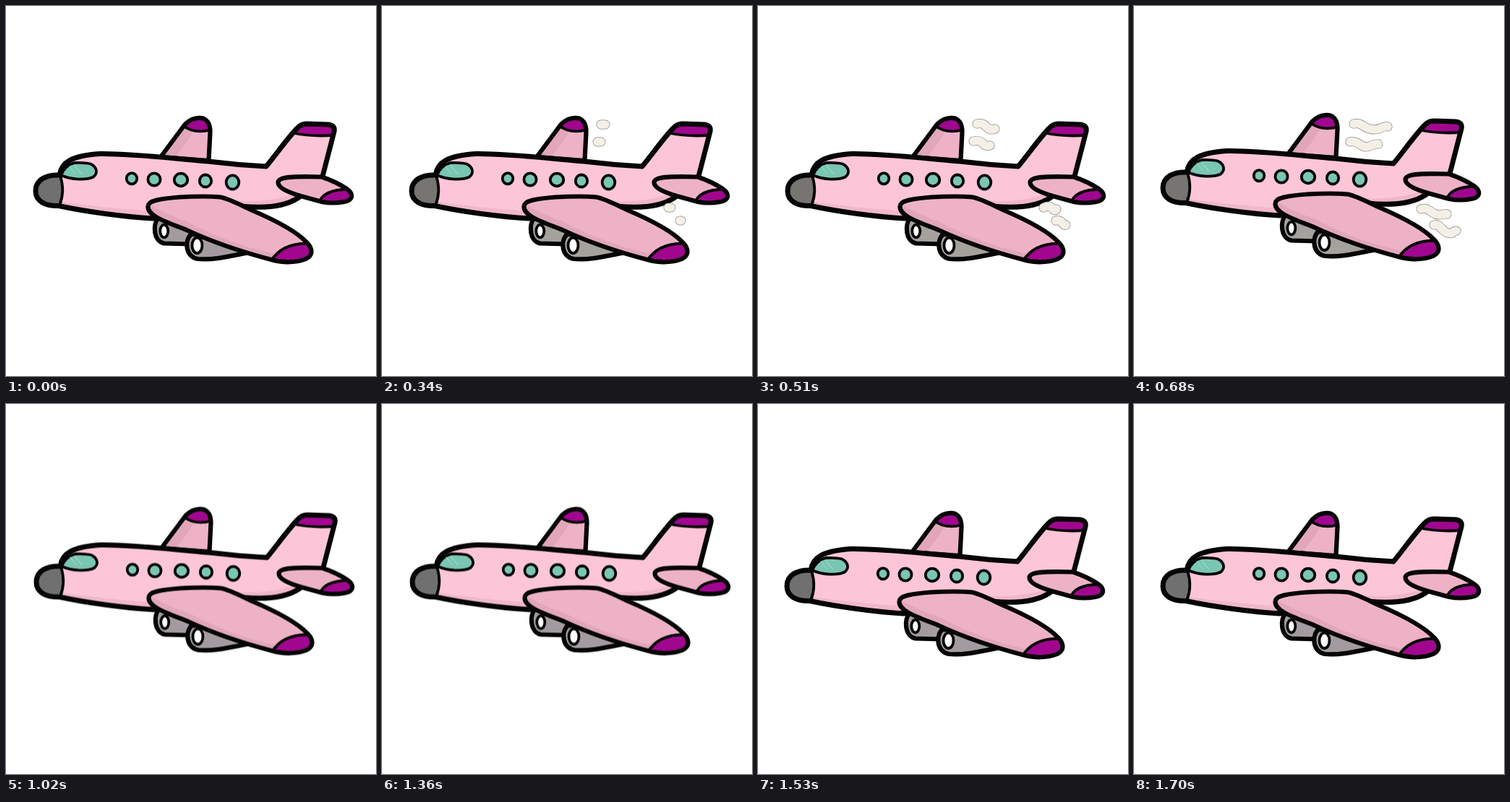
Write an HTML page that moves like this. It is 512x512 px and loops after 1870 ms.

```html
<!DOCTYPE html>
<html lang="en">
<head>
<meta charset="utf-8">
<title>Pink plane</title>
<style>
  html, body { margin: 0; width: 100%; height: 100%; overflow: hidden; background: #fff; }
  svg { display: block; width: 100vw; height: 100vh; }

  .plane, .metal, .nose, .puff { animation: 1870ms step-end infinite; }
  .plane { animation-name: bob; }
  .metal { animation-name: metal; }
  .nose { animation-name: nose; }
  .puff { visibility: hidden; }
  .p1 { animation-name: puff1; }
  .p2 { animation-name: puff2; }
  .p3 { animation-name: puff3; }
  .p4 { animation-name: puff4; }

  /* one step is 1/11 of the loop */
  @keyframes bob {
    0%, 100% { transform: none; }
    36.36% { transform: translate(-1px, -4px); }
    45.45% { transform: translate(1px, -9.5px); }
    81.81% { transform: translate(-1px, -4px); }
  }
  @keyframes metal { 0%, 54.54%, 100% { fill: #a39ba0; } 18.18% { fill: #a5a29d; } }
  @keyframes nose { 0%, 54.54%, 100% { fill: #707070; } 18.18% { fill: #777572; } }
  @keyframes puff1 { 18.18% { visibility: visible; } 27.27%, 100% { visibility: hidden; } }
  @keyframes puff2 { 27.27% { visibility: visible; } 36.36%, 100% { visibility: hidden; } }
  @keyframes puff3 { 36.36% { visibility: visible; } 45.45%, 100% { visibility: hidden; } }
  @keyframes puff4 { 45.45% { visibility: visible; } 54.54%, 100% { visibility: hidden; } }

  .plane { stroke: #050505; stroke-width: 7; stroke-linejoin: round; stroke-linecap: round; }
  .mid { stroke-width: 6.2; }
  .thin { stroke-width: 3.8; }
  .flat { stroke: none; }
  .line { fill: none; }
  .pink { fill: #fcc5d8; }
  .rose { fill: #eeb2c7; }
  .shade { fill: #e2a6bb; }
  .soft { fill: #f0b7ca; }
  .purple { fill: #a1068f; }
  .teal { fill: #7ac6b2; }
  .glint { fill: none; stroke: #9ad8c8; stroke-width: 1.2; }
  .puff { fill: none; stroke-linecap: round; }
  .rim { stroke: #8a8780; stroke-width: 13; }
  .cloud { stroke: #f4f0e8; stroke-width: 11.6; }
</style>
</head>
<body>
<svg viewBox="0 0 512 512">
  <defs>
    <path id="farWing" d="M214 209L247.500 164Q259 152.500 273 155.500Q283 160 282.500 175L280.500 214Z"/>
    <path id="body" d="M74 234C77 216 91 207 130 204.500C175 204 230 211 280 215Q320 220 360 222C374 205 388 185 402 170Q408 163 416 163L446 164Q456 165 454 174L438 236L405 265C386 278 355 280 325 277L203 294C165 292 110 284.500 73 276.500Z"/>
    <path id="nearWing" d="M196.500 277C197 269 214 266.500 240 264.500Q275 262.500 297 264.500C310 267.500 322 274 341 283C369 295 402 312 416 327C425 336 425 345 415 350C403 355 384 356 367 351C325 340 280 324 250 310C225 300 195 291 196.500 277Z"/>
    <path id="tailWing" d="M376.500 244C377 236 398 235.500 437 236.500Q456 243 471 252.500C483 261 479 269 468 271Q452 274 437 271L408 263C391 258 376.500 252 376.500 244Z"/>
    <path id="nose" d="M75 234C56 233 41 240 41 256C41 270 54 277 73 276.500Q84 256 75 234Z"/>
    <clipPath id="inFar"><use href="#farWing"/></clipPath>
    <clipPath id="inBody"><use href="#body"/></clipPath>
    <clipPath id="inNear"><use href="#nearWing"/></clipPath>
    <clipPath id="inTail"><use href="#tailWing"/></clipPath>
  </defs>

  <g class="plane">
    <use href="#farWing" class="rose flat"/>
    <g clip-path="url(#inFar)">
      <path class="shade flat" d="M210 214L248 166L260 172Q248 194 230 212Z"/>
      <path class="purple thin" d="M244 165Q261 178 284 171L284 145H244Z"/>
    </g>
    <use href="#farWing" class="line mid"/>

    <path class="metal mid" d="M211 293C202.500 302 204 326 219 328.500L256 329.500V296Z"/>
    <ellipse cx="218.800" cy="311.500" rx="5.500" ry="8.800" fill="#fff" class="thin"/>
    <path class="metal mid" d="M256 316C246 326 249 348 266 350C287 352 310 346 337 341L290 318Z"/>
    <ellipse cx="264.500" cy="331.300" rx="7" ry="10.700" fill="#fff" class="thin"/>

    <use href="#body" class="pink flat"/>
    <g clip-path="url(#inBody)">
      <path class="soft flat" d="M70 270Q130 279 205 284L210 300L70 290ZM315 270Q365 272 400 260L410 285H315Z"/>
      <path class="purple thin" d="M396 175.500Q424 181.500 458 178.500V155H396Z"/>
    </g>
    <use href="#body" class="line"/>
    <use href="#nose" class="nose flat"/>
    <path class="line thin" d="M75 235Q82 256 74 276"/>
    <path class="line" d="M75 234C56 233 41 240 41 256C41 270 54 277 73 276.500"/>

    <path class="teal thin" d="M76 234C79 226 86 219 95 217Q109 216.500 117 218.500C126 223 127.500 231 121 236.500C112 241 90 241 76 234Z"/>
    <path class="glint" d="M88 222l8 10M95 221l9 11"/>
    <g class="teal thin">
      <ellipse cx="174" cy="238.700" rx="7.300" ry="7.600"/>
      <ellipse cx="205" cy="240" rx="8.600" ry="8.600"/>
      <ellipse cx="242" cy="240.500" rx="9.200" ry="8.800"/>
      <ellipse cx="276" cy="242" rx="8.200" ry="8.500"/>
      <ellipse cx="313.500" cy="244" rx="8.800" ry="9.600"/>
    </g>

    <use href="#tailWing" class="rose flat"/>
    <g clip-path="url(#inTail)">
      <path class="shade flat" d="M376 246Q396 259 436 266V280L376 262Z"/>
      <path class="purple thin" d="M433 273Q438 254 474 253.500L490 260L475 280Z"/>
    </g>
    <use href="#tailWing" class="line mid"/>

    <use href="#nearWing" class="rose flat"/>
    <g clip-path="url(#inNear)">
      <path class="shade flat" d="M196 272Q214 286 250 298Q310 330 372 343L368 358L190 304Z"/>
      <path class="purple thin" d="M366 354Q381 328 418 328.500L435 340L415 365Z"/>
    </g>
    <use href="#nearWing" class="line mid"/>
  </g>

  <g id="puffs"></g>
</svg>
<script>
  const puffs = [
    "M303 164h6M298 188h5M396 279h4M412 297h2",
    "M303 163Q311 161 316 167T328 170M298 187Q307 185 311 190T321 193M395 279Q403 275 407 280T413 281M412 297Q418 296 421 300T426 303",
    "M304 163C316 160 318 171 332 171S340 165 351 167M299 188C310 186 312 194 320 195S328 190 338 191M397 281C406 278 410 285 417 288S426 287 433 288M415 303C424 301 425 311 434 314S440 311 446 311",
    "M332 170Q340 171 343 168T355 167M318 195Q326 195 330 192T338 192M414 282Q420 286 425 284T433 285M429 308Q434 312 439 310T446 309"
  ];
  document.getElementById("puffs").innerHTML = puffs.map((d, i) =>
    `<g class="puff p${i + 1}"><path class="rim" d="${d}"/><path class="cloud" d="${d}"/></g>`
  ).join("");
</script>
</body>
</html>
```
